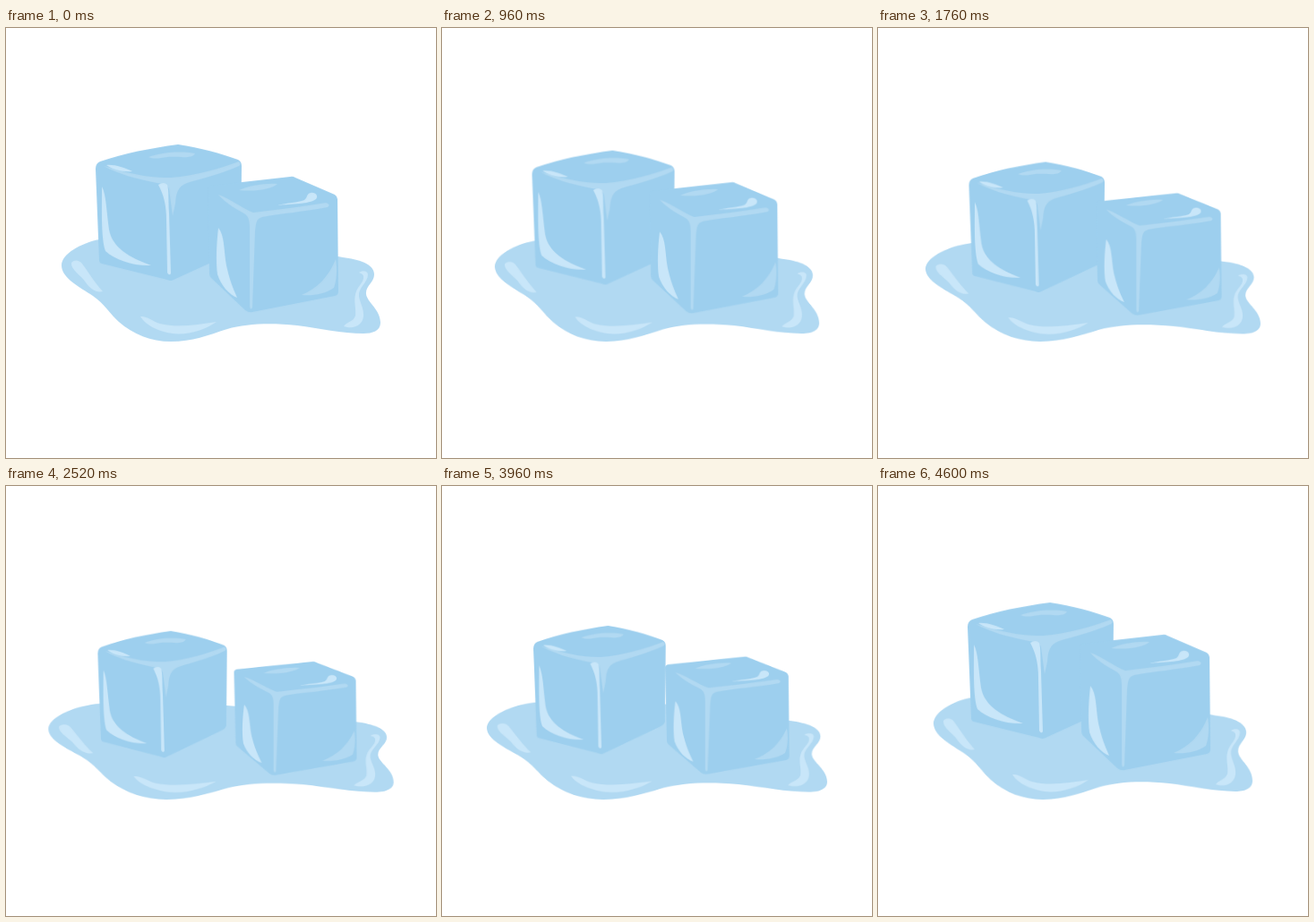
An HTML page for the animation above (4.64 s loop, 480 px wide and 480 px high).

```html
<!DOCTYPE html>
<html lang="en">
<head>
<meta charset="utf-8">
<title>Melting ice cubes</title>
<style>
  html, body { margin: 0; width: 100%; height: 100%; overflow: hidden; background: #fff; }
  svg { display: block; width: 100%; height: 100%; }
  g { transform-origin: 0 0; }
  .ice { fill: #9dcfee; }
  .pale { fill: #b1d9f2; }
  .shine { fill: #c8e6f9; }
</style>
</head>
<body>
<svg viewBox="0 0 480 480">
  <g id="puddle">
    <path class="pale" d="M62 265C62 252 84 240 104 236C140 230 200 232 250 237C300 242 350 251 376 256C393 258 411 263 411 275C411 284 401 288 402 297C403 306 418 314 418 329C418 338 409 341 399 341C375 341 350 335 325 332C295 329 268 330 247 336C225 343 208 350 184 350C162 350 142 342 126 328C116 319 110 308 97 299C82 289 62 279 62 265Z"/>
    <path class="shine" d="M73 262C76 258 82 259 85 263C93 274 99 284 108 294C101 296 94 291 89 284C84 276 72 270 73 262Z"/>
    <path class="shine" d="M150 322C157 321 163 327 172 330C192 335 213 331 235 328C222 337 203 343 186 341C170 339 155 331 150 322Z"/>
    <path class="shine" d="M394 273C398 270 404 271 404 275C404 284 393 290 394 299C395 307 400 313 399 322C398 331 389 337 377 333C380 328 388 328 390 321C391 313 388 305 390 297C392 288 400 284 399 277C398 274 396 274 394 273Z"/>
  </g>
  <g id="left">
    <path class="ice" d="M105 149C132 140 161 134 192 130C217 134 240 140 259 147Q263 149 263 154L262 244Q261 247 257 249L187 281Q184 283 180 281L107 263Q104 262 104 259L100 157Q100 151 105 149Z"/>
    <path class="pale" d="M109 154C136 162 161 168 184 167C211 165 238 157 260 149Q263 152 260 154C240 163 218 168 202 173C191 177 190 185 189 196L186 210L182 180C181 174 173 174 164 172C145 168 125 163 109 154Z"/>
    <path class="pale" d="M159 144C173 139 193 137 211 140C207 147 193 143 180 144C172 145 166 147 159 144Z"/>
    <path class="shine" d="M112 153C121 152 132 156 141 160C130 161 119 158 112 153Z"/>
    <path class="shine" d="M107 177C112 186 112 205 115 225C119 246 138 256 162 265C143 266 122 259 111 249C106 235 107 203 107 177Z"/>
    <path class="shine" d="M170 175Q176 171 180 175C182 181 181 193 182 206L184 274Q182 277 180 273L179 215C179 198 176 186 170 175Z"/>
  </g>
  <g id="right">
    <path class="ice" d="M228 176L317 166Q320 165 323 167L367 186Q370 188 370 191L371 294Q371 298 367 299L275 317Q271 318 267 315L229 279Q227 277 227 274L225 180Q225 177 228 176Z"/>
    <path class="pale" d="M237 186C251 191 263 201 276 206C302 203 332 199 357 195Q363 197 359 200C333 205 307 207 286 211C279 213 279 218 278 227L275 312Q273 316 272 311L272 224C272 213 270 209 264 206C253 200 244 194 237 186Z"/>
    <path class="pale" d="M260 181C271 176 288 173 303 174C296 180 278 183 260 181Z"/>
    <path class="shine" d="M303 198C314 195 325 195 333 192C337 189 335 185 340 184C346 183 349 188 346 191C338 197 318 196 303 198Z"/>
    <path class="shine" d="M237 223C244 231 243 248 246 265C249 279 253 290 258 301C249 298 240 287 236 275C234 260 235 240 237 223Z"/>
    <path class="pale" d="M368 258C370 269 369 283 366 290C356 297 343 299 330 298C347 291 360 278 368 258Z"/>
  </g>
</svg>
<script>
  const LOOP = 4640, MELT = 3520;
  const easing = 'cubic-bezier(.37, 0, .63, 1)';
  const rest = 'matrix(1, 0, 0, 1, 0, 0)';

  // Fully melted pose of each part: scale x, scale y, shift x, shift y
  const melted = {
    puddle: [1.101, 0.91, -24.24, 31.5],
    left: [0.859, 0.914, 17.1, 50.2],
    right: [0.924, 0.8, 53.3, 70.2]
  };

  for (const [id, [sx, sy, x, y]] of Object.entries(melted)) {
    document.getElementById(id).animate([
      { transform: rest, easing },
      { transform: `matrix(${sx}, 0, 0, ${sy}, ${x}, ${y})`, offset: MELT / LOOP, easing },
      { transform: rest }
    ], { duration: LOOP, iterations: Infinity });
  }
</script>
</body>
</html>
```
